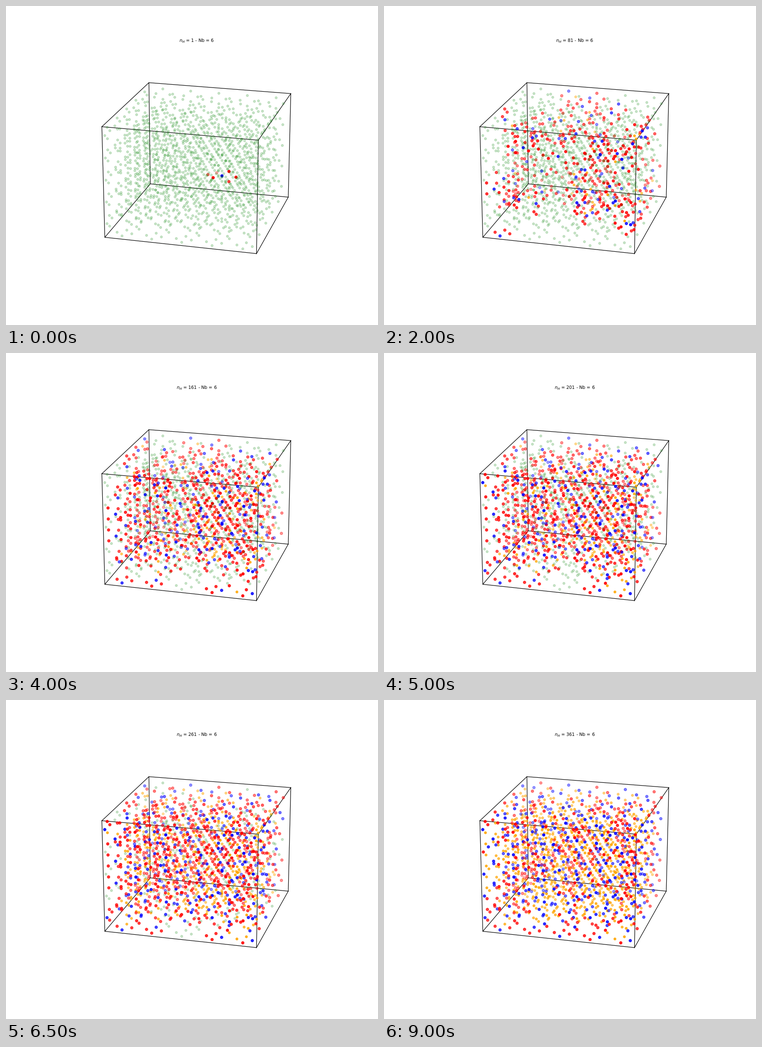
Write a matplotlib script that moves like this. It is 808x693 px and loops after 9500 ms.

```python
import itertools

import matplotlib.pyplot as plt
import numpy as np
from matplotlib.animation import FuncAnimation
from matplotlib.colors import to_rgb

plt.rcParams["text.hinting"] = "none"

W, H, DPI = 808, 693, 64
PT = 57.72 / DPI            # point size relative to the figure dpi
CELLS = 5
FRAMES, STEP = 19, 20
LAST = 1 + STEP * (FRAMES - 1)
FIRST_ATOM = (2.75, 4.5, 1)

# camera
ELEV, AZIM, DIST = np.radians(20), np.radians(-75), 10
SIDE = 0.77 * H
SCALE = SIDE / 0.185
SHIFT = SIDE * (0.95 / 1.85 - 0.5)
CX, CY = 0.5125 * W + SHIFT, 0.505 * H - SHIFT
HALF = np.array([4, 4, 3]) / 7


def project(cell_pos):
    """Screen x, y and depth of points given in unit cells."""
    p = (np.asarray(cell_pos) / CELLS * 2 - 1) * HALF
    ce, se, ca, sa = np.cos(ELEV), np.sin(ELEV), np.cos(AZIM), np.sin(AZIM)
    right = p @ [-sa, ca, 0]
    up = p @ [-se * ca, -se * sa, ce]
    dist = DIST - p @ [ce * ca, ce * sa, se]
    return np.c_[CX + SCALE * right / dist, CY - SCALE * up / dist], -DIST / dist


def tetra_sites():
    """Tetrahedral sites of a bcc crystal."""
    face = [(.5, .25), (.5, .75), (.25, .5), (.75, .5)]
    base = [(0, a, b) for a, b in face]
    base += [(a, 1, b) for a, b in face]
    base += [(a, b, 0) for a, b in face]
    corners = itertools.product(range(CELLS), repeat=3)
    return np.array([np.add(c, b) for c in corners for b in base])


sites = tetra_sites()
xy, depth = project(sites)
gap = np.linalg.norm(sites[:, None] - sites[None], axis=2)
near = (gap > 0) & (gap < 0.51)


def fill(seed):
    """Place atoms on random open sites until none is left."""
    rng = np.random.default_rng(seed)
    is_open = np.ones(len(sites), bool)
    i = np.linalg.norm(sites - FIRST_ATOM, axis=1).argmin()
    placed = []
    while True:
        placed.append(i)
        is_open[i] = False
        is_open[near[i]] = False
        if not is_open.any():
            return placed
        i = rng.choice(np.flatnonzero(is_open))


# the run that is full soonest after the last count shown
order = min(map(fill, range(30)), key=lambda run: (len(run) < LAST, len(run)))


def layer(mask, color, size, alpha=None):
    """Points of one kind, far to near, faded with depth unless alpha is set."""
    ids = np.flatnonzero(mask)
    ids = ids[np.argsort(-depth[ids])]
    z = depth[ids]
    rgba = np.empty((len(ids), 4))
    rgba[:, :3] = to_rgb(color)
    rgba[:, 3] = alpha or 1 - 0.7 * (z - z.min()) / max(np.ptp(z), 1e-9)
    return z.min(), xy[ids], rgba, np.full(len(ids), size * PT ** 2)


fig = plt.figure(figsize=(W / DPI, H / DPI), dpi=DPI, facecolor="white")
ax = fig.add_axes([0, 0, 1, 1])
ax.set(xlim=(0, W), ylim=(H, 0))
ax.axis("off")

corners = np.array(list(itertools.product((0, CELLS), repeat=3)))
for a, b in itertools.combinations(corners, 2):
    if np.count_nonzero(a != b) == 1:
        ends, _ = project([a, b])
        ax.plot(*ends.T, color="black", lw=1.5 * PT, zorder=2)

dots = ax.scatter(*xy.T, lw=1.5 * PT, zorder=3)
title = ax.text(0.5125 * W, 0.12 * H - 6 * PT * DPI / 72, "",
                fontsize=12 * PT, ha="center", va="baseline")


def draw(frame):
    count = 1 + STEP * frame
    held = np.zeros(len(sites), bool)
    held[order[:count]] = True
    load = near[held].sum(axis=0)
    kinds = [
        (held, "blue", 50),
        (~held & (load == 1), "red", 50),
        (~held & (load > 1), "orange", 36),
        (~held & (load == 0), "green", 36, 0.2),
    ]
    layers = [layer(*kind) for kind in kinds if kind[0].any()]
    layers.sort(key=lambda item: -item[0])
    _, points, colors, sizes = map(np.concatenate, zip(*[
        ([z], *rest) for z, *rest in layers]))
    dots.set_offsets(points)
    dots.set_sizes(sizes)
    dots.set_facecolor(colors)
    dots.set_edgecolor(colors)
    title.set_text(f"$n_H$ = {count} - Nb = 6")
    return dots, title


anim = FuncAnimation(fig, draw, frames=FRAMES, interval=500,
                     repeat=True, repeat_delay=0)
plt.show()
```
